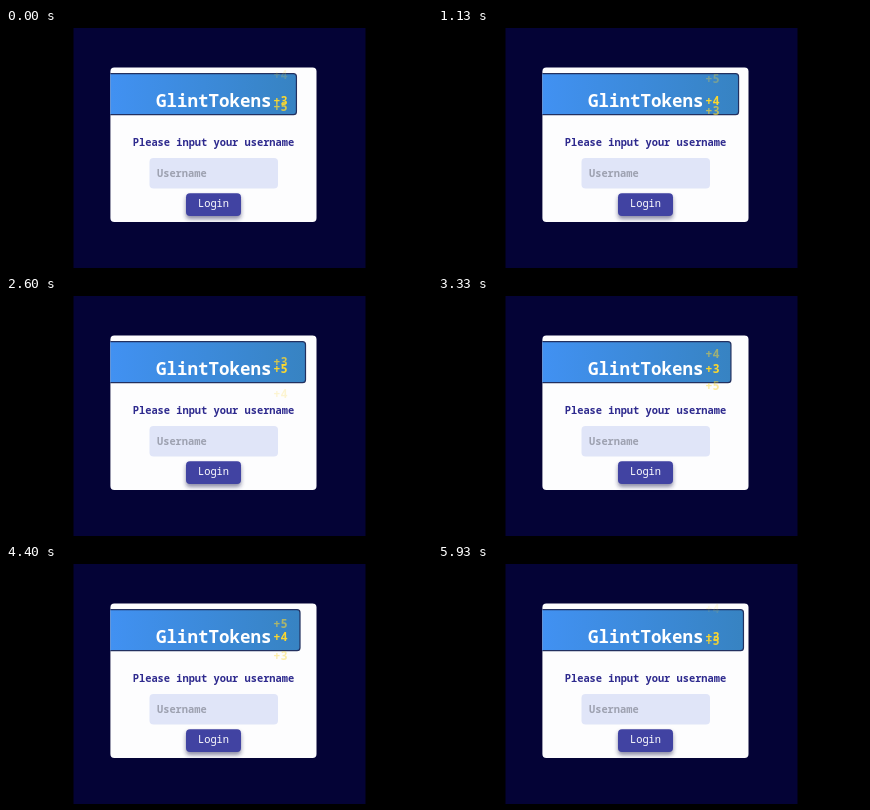
These frames come from a looping animation (426x240 px, 5990 ms). An HTML page:

```html
<!DOCTYPE html>
<html lang="en">
<head>
<meta charset="utf-8">
<title>Login card</title>
<style>
  html, body { margin: 0; width: 100%; height: 100%; overflow: hidden; background: #000; }
  svg { display: block; width: 100vw; height: 100vh; }
  text { font-family: "Noto Sans Mono", "DejaVu Sans Mono", monospace; font-size: 10.35px; }
  .bold { font-weight: 700; }
  .title { font-size: 17.5px; fill: #fff; }
  .points { font-size: 12px; font-weight: 600; fill: #fbd72f; }
</style>
</head>
<body>
<svg viewBox="0 0 426 240">
  <defs>
    <linearGradient id="sky">
      <stop offset="0" stop-color="#4191f2"/>
      <stop offset="1" stop-color="#3783c2"/>
    </linearGradient>
    <filter id="soft" x="-20%" y="-40%" width="140%" height="200%">
      <feGaussianBlur stdDeviation="2"/>
    </filter>
  </defs>

  <rect width="426" height="240" fill="#000"/>
  <rect x="67.5" width="292" height="240" fill="#040336"/>
  <rect x="104.4" y="39.5" width="206.1" height="154.5" rx="4" fill="#fdfdfe"/>

  <path id="bar" fill="url(#sky)"/>
  <path id="edge" fill="none" stroke="#22305f" stroke-width="1.2"/>
  <text class="title bold" x="150" y="79">GlintTokens</text>
  <g id="counter"></g>

  <text class="bold" x="126.8" y="117.6" fill="#2e2a8e">Please input your username</text>
  <rect x="143.5" y="130" width="128.5" height="30.5" rx="4" fill="#e0e5f8"/>
  <text class="bold" x="151" y="148.8" fill="#9da1b0">Username</text>

  <rect x="180" y="168" width="55" height="23" rx="4" fill="#1c1c50" opacity=".5" filter="url(#soft)"/>
  <rect x="180" y="165.2" width="55" height="22.8" rx="4" fill="#4143a2"/>
  <text x="192" y="179.4" fill="#fff">Login</text>
</svg>

<script>
  const LOOP = 5990, FPS = 15, LEAD = 0.193;
  const TRAVEL = 32, BASELINE = 76.7;
  const BAR = { left: 104.4, top: 45.7, bottom: 86.7, min: 288.7, max: 306.6, radius: 3 };
  const $ = id => document.getElementById(id);

  const labels = [3, 4, 5].map(value => {
    const el = document.createElementNS("http://www.w3.org/2000/svg", "text");
    el.setAttribute("class", "points");
    el.setAttribute("x", 267.3);
    el.textContent = "+" + value;
    $("counter").append(el);
    return el;
  });

  function drawBar(s) {
    const wave = 1 - Math.abs(s % 4 / 2 - 1);
    const { left, top, bottom, min, max, radius: r } = BAR;
    const right = min + (max - min) * wave;
    const d = `M${left} ${top}H${right - r}q${r} 0 ${r} ${r}V${bottom - r}q0 ${r} ${-r} ${r}H${left}`;
    $("bar").setAttribute("d", d + "Z");
    $("edge").setAttribute("d", d);
  }

  // Each label spends one second falling in, one resting, one falling out.
  function drawCounter(s) {
    labels.forEach((el, i) => {
      const age = (s - i + 4) % 3;
      const shift = age < 1 ? age - 1 : Math.max(0, age - 2);
      el.setAttribute("y", BASELINE + TRAVEL * shift);
      el.setAttribute("opacity", 1 - Math.abs(shift));
    });
  }

  const start = performance.now();
  function draw() {
    const t = Math.max(0, performance.now() - start) % LOOP;
    const s = LEAD + Math.floor((t + 4) * FPS / 1000) / FPS;
    drawBar(s);
    drawCounter(s);
    requestAnimationFrame(draw);
  }
  draw();
</script>
</body>
</html>
```
